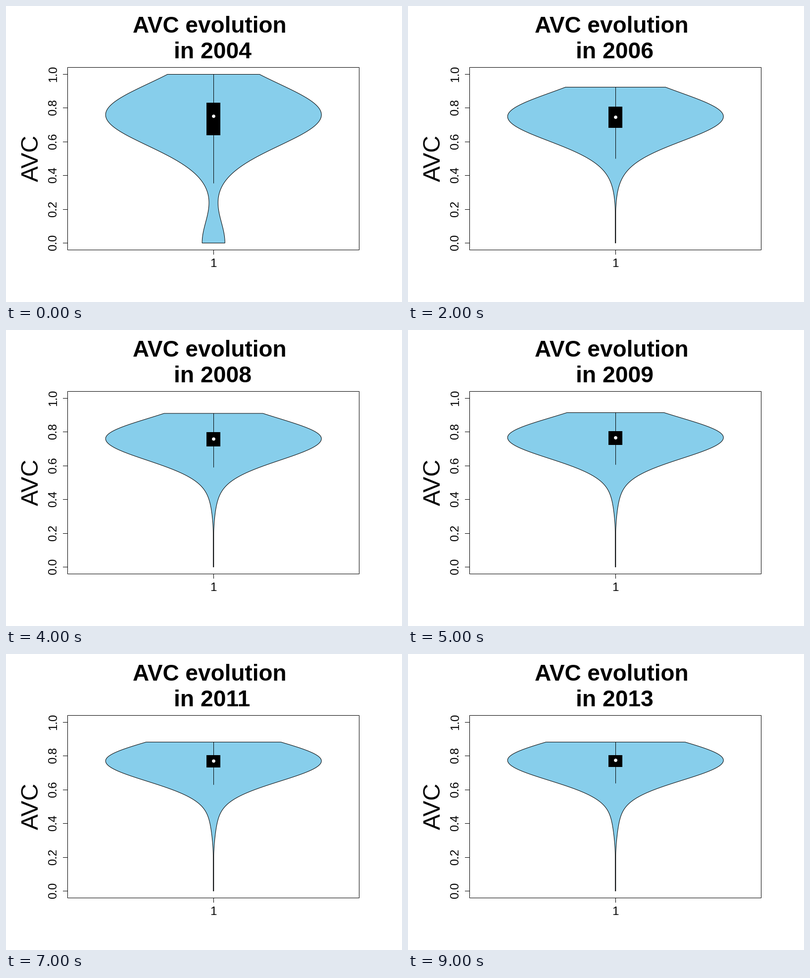
A matplotlib script that plays this animation: 800 by 600 pixels, repeating every 10000 ms.

```python
import numpy as np
import matplotlib.pyplot as plt
from matplotlib.animation import FuncAnimation
from matplotlib.patches import Circle, Polygon, Rectangle

PX = 0.72            # points per pixel at 100 dpi
FONT = "Liberation Sans"
MID = 419.2          # centre line of the violin
HALF = 218           # widest half width
BASE = 480.5         # pixel row of value 0
UNIT = 342           # pixels per unit of AVC


def bell(x, spread):
    return np.exp(-0.5 * (x / spread) ** 2)


def settle(t, start, end, tau, power=1.0):
    """Ease from start towards end as the years pass."""
    return end + (start - end) * np.exp(-(t / tau) ** power)


def outline(t, top, peak):
    y = np.linspace(top, BASE, 160)
    d = y - peak
    above = settle(t, 62.8, 39.3, 2.0, 1.4)
    below = settle(t, 62.5, 41.0, 2.3, 1.2)
    skirt = settle(t, 2.0, 6.0, 2.5)
    foot = max(0, 23 - 11.5 * t)
    half = HALF * bell(d, np.where(d < 0, above, below))
    half += skirt * bell(d - 110, 37) + foot * bell(y - BASE, 47)
    half = np.maximum(half * HALF / half.max(), 0.5)
    x = np.concatenate([MID - half, (MID + half)[::-1]])
    return np.column_stack([x, np.concatenate([y, y[::-1]])])


fig = plt.figure(figsize=(8, 6), dpi=100, facecolor="white")
ax = fig.add_axes([0, 0, 1, 1])
ax.set_xlim(0, 800)
ax.set_ylim(600, 0)
ax.axis("off")


def line(x, y, z=1):
    return ax.plot(x, y, color="black", lw=PX, snap=False, zorder=z,
                   solid_capstyle="butt", solid_joinstyle="miter")[0]


def label(x, y, text, size, **kw):
    return ax.text(x, y, text, fontsize=size * PX, family=FONT,
                   va="baseline", rotation_mode="anchor", **kw)


# frame, axes and fixed text
ax.add_patch(Rectangle((124.5, 124.5), 589, 370, fill=False, ec="black",
                       lw=PX, snap=False))
line([419.5, 419.5], [494.5, 504])
label(418.5, 529, "1", 24, ha="center")
for k in range(6):
    y = np.floor(BASE - UNIT * k / 5) + 0.5
    line([115, 124.5], [y, y])
    label(102, y - 1, f"{k / 5:.1f}", 24, ha="center", rotation=90)
label(65, 309, "AVC", 48, ha="center", rotation=90)
label(256, 54.5, "AVC evolution", 46, ha="left", weight="bold")
title = label(339, 106.5, "", 46.3, ha="left", weight="bold")

violin = Polygon([(0, 0), (1, 1), (0, 1)], closed=True, fc="#87CEEB",
                 ec="black", lw=PX, snap=False, zorder=2)
box = Rectangle((405, 0), 28, 1, fc="black", lw=0, zorder=4)
dot = Circle((419.5, 0), 3.4, fc="white", lw=0, zorder=5)
for patch in (violin, box, dot):
    ax.add_patch(patch)
whisker = line([419.5, 419.5], [0, 1], 3)


def draw(t):
    top = np.interp(t, [1, 2, 3, 5, 7], [138.5, 164.5, 170.5, 167.5, 178.5])
    median = np.interp(t, [0, 1, 3, 5, 9], [223.5, 227.5, 223.5, 218.5, 215.5])
    q3 = np.interp(t, [0, 3, 5], [196, 208, 205])
    q1 = settle(t, 262, 228, 3.0, 1.3)
    reach = 1.5 * (q1 - q3 - 1)
    violin.set_xy(outline(t, top, median - settle(t, 3, 0, 3)))
    whisker.set_ydata([max(top, q3 - reach), q1 + reach])
    box.set_y(q3)
    box.set_height(q1 - q3)
    dot.center = (419.5, median)
    title.set_text(f"in {2004 + t}")
    return violin, whisker, box, dot, title


anim = FuncAnimation(fig, draw, frames=10, interval=1000, repeat=True,
                     repeat_delay=0)
plt.show()
```
